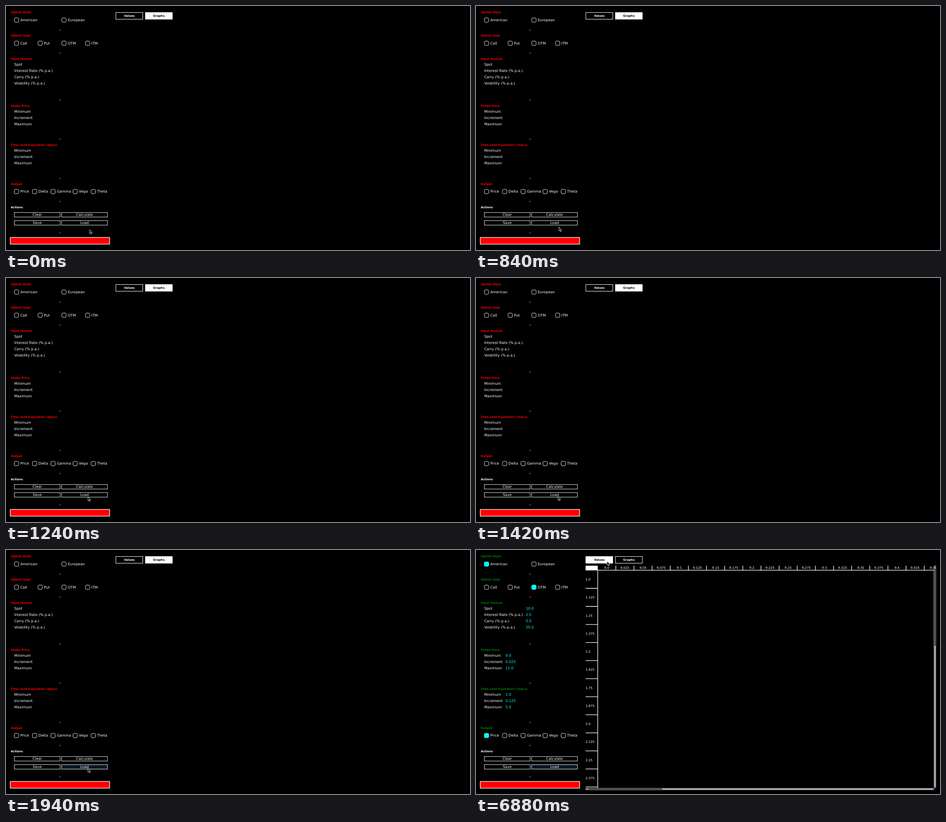
Recreate the animation shown at these times as an HTML page. Size 1030 px wide and 544 px high, loop 8000 ms.

```html
<!DOCTYPE html>
<html lang="en">
<head>
<meta charset="utf-8">
<title>Option calculator</title>
<style>
html, body { margin: 0; width: 100%; height: 100%; overflow: hidden; background: #000; }
svg { display: block; width: 100%; height: 100%; }
text { font: 8px "DejaVu Sans", sans-serif; fill: #fff; text-rendering: geometricPrecision; }
text.bold { font-weight: bold; font-size: 6.4px; }
text.cell { font-size: 7px; }
text.value { fill: #0ff; }
.mid { text-anchor: middle; }
.box { fill: none; stroke: #fff; stroke-width: .9; }
.grip { fill: none; stroke: #777; stroke-width: .5; }
.rule { fill: none; stroke: #fff; stroke-width: 1.3; }
.bar { stroke: #fff; stroke-width: .8; }

.head, .loaded, .graph, .table, #load, #cursor, .tab rect, .tab text {
  animation: 8s step-end infinite;
}
text.head { fill: #f00; animation-name: head; }
.loaded { visibility: hidden; animation-name: loaded; }
.graph { visibility: hidden; animation-name: graph; }
.table { visibility: hidden; animation-name: table; }
#load { animation-name: hover; }
#cursor { animation-name: move; fill: #000; stroke: #fff; stroke-width: .8; }
.tab rect { stroke: #fff; }
.tab.off rect { animation-name: toWhite; }
.tab.off text { animation-name: toBlack; }
.tab.on rect { animation-name: toBlack; }
.tab.on text { animation-name: toWhite; }

@keyframes head { 0% { fill: #f00 } 26.25%, 100% { fill: #008000 } }
@keyframes loaded { 0% { visibility: hidden } 26.25%, 100% { visibility: visible } }
@keyframes graph { 0% { visibility: hidden } 26.25% { visibility: visible } 86%, 100% { visibility: hidden } }
@keyframes table { 0% { visibility: hidden } 86%, 100% { visibility: visible } }
@keyframes toWhite { 0% { fill: #000 } 86%, 100% { fill: #fff } }
@keyframes toBlack { 0% { fill: #fff } 86%, 100% { fill: #000 } }
@keyframes hover { 0% { fill: #000 } 22.75% { fill: #060c13 } 24.25%, 100% { fill: #0c1926 } }
@keyframes move {
  0% { transform: translate(185.4px, 498.6px) }
  8.5% { transform: translate(184px, 496px) }
  8.75% { transform: translate(184px, 495px) }
  9% { transform: translate(184px, 494px) }
  9.25% { transform: translate(184px, 493px) }
  12.25% { transform: translate(183.8px, 492px) }
  13.75% { transform: translate(183.2px, 491px) }
  14% { transform: translate(182.8px, 490px) }
  15.25% { transform: translate(182.4px, 489px) }
  15.5% { transform: translate(182px, 488px) }
  17.5% { transform: translate(181.8px, 487.4px) }
  17.75% { transform: translate(181.7px, 486.6px) }
  86%, 100% { transform: translate(291px, 25px) }
}
</style>
</head>
<body>
<svg id="stage" viewBox="0 0 1030 544" preserveAspectRatio="none"></svg>
<script>
const stage = document.getElementById('stage');

function add(parent, tag, attrs, text) {
  const el = document.createElementNS('http://www.w3.org/2000/svg', tag);
  for (const key in attrs) el.setAttribute(key, attrs[key]);
  if (text !== undefined) el.textContent = text;
  parent.appendChild(el);
  return el;
}
const group = cls => add(stage, 'g', { class: cls });
const label = (x, y, text, cls = '', parent = stage) =>
  add(parent, 'text', { x, y, class: cls }, text);
const rect = (x, y, width, height, attrs = {}, parent = stage) =>
  add(parent, 'rect', { x, y, width, height, ...attrs });
const path = (d, attrs, parent = stage) => add(parent, 'path', { d, ...attrs });

// Side panel
[['Option Style', 16], ['Option Type', 68], ['Input Factors', 120],
 ['Strike Price', 225], ['Time until Expiration (Years)', 312], ['Output', 399]]
  .forEach(([text, y]) => label(10.8, y, text, 'bold head'));
label(10.8, 450.6, 'Actions', 'bold');

for (const y of [53.6, 105.2, 209.8, 296.8, 384.4, 435.8, 505.6])
  path(`M118.2 ${y - .8}h1.5v1.6h-1.5zM120.4 ${y - .8}h1.5v1.6h-1.5z`, { class: 'grip' });

function checks(y, items, picked) {
  for (const [text, x] of items) {
    rect(x, y - 4.8, 9.6, 9.6, { class: 'box', rx: 2.4 });
    if (text === picked)
      rect(x, y - 4.8, 9.6, 9.6, { class: 'loaded', rx: 2.4, fill: '#0ff', stroke: '#0ff' });
    label(x + 13.2, Math.round(y + 2.6), text);
  }
}
checks(31.4, [['American', 18.5], ['European', 123.8]], 'American');
checks(83, [['Call', 18.5], ['Put', 71.1], ['OTM', 123.8], ['ITM', 176.4]], 'OTM');
checks(413.7, [['Price', 18.5], ['Delta', 58.8], ['Gamma', 99.7], ['Vega', 148.6], ['Theta', 188.9]], 'Price');

function fields(y, valueX, rows) {
  rows.forEach(([name, value], i) => {
    label(18.2, y + i * 14, name);
    label(valueX, y + i * 14, value, 'value loaded');
  });
}
fields(133, 110.4, [['Spot', '10.0'], ['Interest Rate (% p.a.)', '2.5'],
  ['Carry (% p.a.)', '0.0'], ['Volatility (% p.a.)', '25.0']]);
fields(238, 65.4, [['Minimum', '9.0'], ['Increment', '0.025'], ['Maximum', '11.0']]);
fields(325, 65.4, [['Minimum', '1.0'], ['Increment', '0.125'], ['Maximum', '5.0']]);

function button(text, x, y, id) {
  const el = rect(x, y, 101.7, 10, { class: 'box' });
  if (id) el.id = id;
  label(x + 50.8, y + 7.5, text, 'mid');
}
button('Clear', 18.5, 460.5);
button('Calculate', 123.5, 460.5);
button('Save', 18.5, 478.5);
button('Load', 123.5, 478.5, 'load');
rect(9.5, 516, 220.5, 15, { fill: '#f00', stroke: '#fff', 'stroke-width': 1.3 });

// Tabs
function tab(text, x, state) {
  const g = group('tab ' + state);
  rect(x, 14.5, 59.8, 15, {}, g);
  label(x + 30, 24.2, text, 'bold mid', g);
}
tab('Values', 243.8, 'off');
tab('Graphs', 309.4, 'on');

// Perspective grid
const [A, B, C, D] = [[391, 403], [712, 305.5], [846.5, 362.5], [488, 520.5]];
const graph = group('graph');
const diff = (p, q) => [p[0] - q[0], p[1] - q[1]];
const cross = (p, q) => p[0] * q[1] - p[1] * q[0];
const e1 = diff(B, C), e2 = diff(D, C);
const e3 = [A[0] - B[0] + C[0] - D[0], A[1] - B[1] + C[1] - D[1]];
const gu = cross(e3, e2) / cross(e1, e2);
const gv = cross(e1, e3) / cross(e1, e2);
const project = (u, v) => [0, 1].map(i =>
  ((A[i] + (B[i] - A[i] + gu * B[i]) * u + (D[i] - A[i] + gv * D[i]) * v) /
   (1 + gu * u + gv * v)).toFixed(2)).join(' ');
const segment = (u1, v1, u2, v2) => `M${project(u1, v1)}L${project(u2, v2)}`;

let strikes = '', times = '';
for (let i = 0; i <= 80; i++) strikes += segment(0, i / 80, 1, i / 80);
for (let i = 0; i <= 32; i++) times += segment(i / 32, 0, i / 32, 1);
path(strikes, { stroke: '#808080', 'stroke-width': .36 }, graph);
path(times, { stroke: '#808080', 'stroke-width': .36 }, graph);
path(segment(0, 0, 0, 1), { stroke: '#202080', 'stroke-width': .5 }, graph);
path('M340.2 36L391 403', { stroke: '#008000', 'stroke-width': .75 }, graph);

// Value table
const table = group('table');
const step = 40.27;
const clip = add(table, 'clipPath', { id: 'view' });
rect(243, 34, 773.2, 497, {}, clip);
const cells = add(table, 'g', { 'clip-path': 'url(#view)' });
rect(243.3, 35, 27, 10.4, { fill: '#fff' }, cells);
const decimal = n => Number.isInteger(n) ? n.toFixed(1) : String(n);
let rules = 'M270 45.2H1017M270.2 45V530.5';
for (let i = 0; i < 19; i++) {
  label(290.2 + i * step, 42.4, decimal((9000 + i * 25) / 1000), 'cell mid', cells);
  if (i < 18) rules += `M${310.4 + i * step} 35v10`;
}
for (let i = 0; i < 12; i++) {
  label(243.2, 68 + i * step, decimal(1 + i / 8), 'cell', cells);
  rules += `M243.3 ${85.5 + i * step}h27`;
}
path(rules, { class: 'rule' }, cells);

// Scroll bars
function bar(x, y, w, h, fill = '#000') {
  rect(x, y, w, h, { class: 'bar', fill }, table);
}
bar(1017.2, 35.4, 3.4, 494.6);
bar(1017.2, 40, 3.4, 486.4, '#808080');
bar(1017.2, 40, 3.4, 175);
bar(243.8, 531.4, 772.4, 3.2);
bar(248.2, 531.4, 764, 3.2, '#808080');
bar(248.2, 531.4, 166.6, 3.2);
path('M1018 38.4l.9-1.4l.9 1.4zM1018 527.4l.9 1.4l.9-1.4zM246.6 532.1l-1.4.9l1.4.9zM1013.6 532.1l1.4.9l-1.4.9z',
  { fill: '#ccc' }, table);

path('M0 0V8.6L2 6.8L3.4 10L5 9.3L3.6 6.2H6Z', { id: 'cursor' });
</script>
</body>
</html>
```
